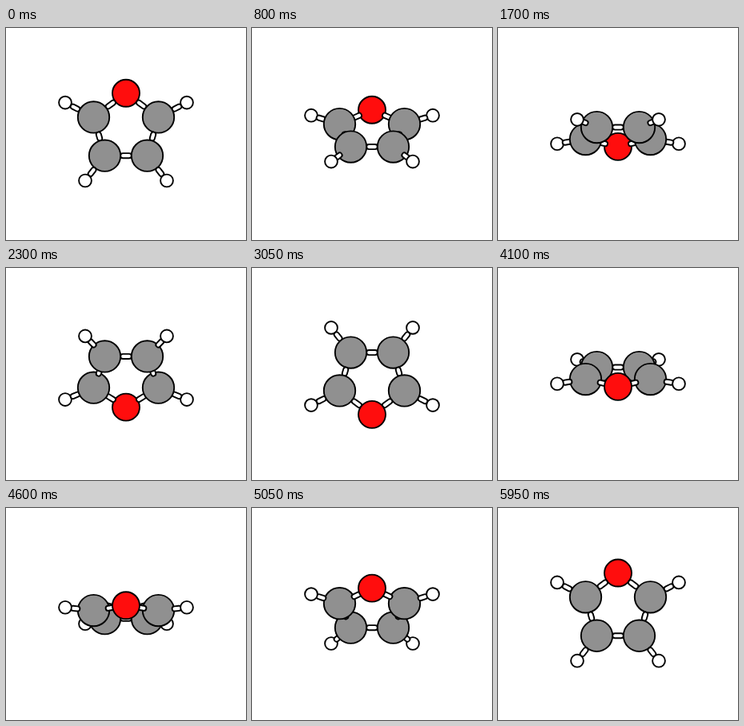
An HTML page with a canvas that plays this animation: 300 px wide and 266 px high, repeating every 6000 ms.

```html
<!DOCTYPE html>
<html lang="en">
<head>
<meta charset="utf-8">
<title>Rotating ring molecule</title>
<style>
html, body { margin: 0; width: 100%; height: 100%; overflow: hidden; background: #fff; }
canvas { display: block; }
</style>
</head>
<body>
<canvas id="stage" width="300" height="266"></canvas>
<script>
const ctx = document.getElementById('stage').getContext('2d');
const CX = 150, CY = 133;
const LOOP = 6000, STEP = 50, STEP_DEG = 3, START_DEG = 6;
const LINE = 1.9, BOND = 8, GAP = 3;

const KINDS = {
  O: { r: 17, fill: '#ff0d0d' },
  C: { r: 19.7, fill: '#909090' },
  H: { r: 7.9, fill: '#ffffff' }
};

// Flat molecule: x and y measured from the rotation centre
const atom = (kind, x, y) => ({ ...KINDS[kind], x, y });
const atoms = [
  atom('O', 0, -51.5),
  atom('C', -40.5, -21.2), atom('C', 40.5, -21.2),
  atom('C', -26.5, 27.3), atom('C', 26.5, 27.3),
  atom('H', -76, -39.6), atom('H', 76, -39.6),
  atom('H', -51, 58.8), atom('H', 51, 58.8)
];

const bonds = [[0, 1], [0, 2], [1, 3], [2, 4], [3, 4], [1, 5], [2, 6], [3, 7], [4, 8]]
  .map(([i, j]) => {
    const a = atoms[i], b = atoms[j];
    const dx = b.x - a.x, dy = b.y - a.y, len = Math.hypot(dx, dy);
    const along = d => ({ x: a.x + dx * d / len, y: a.y + dy * d / len });
    return {
      from: along(a.r + GAP),
      to: along(len - b.r - GAP),
      y: (a.y + b.y) / 2
    };
  });

const parts = [...bonds, ...atoms];

function drawAtom(a, c) {
  ctx.beginPath();
  ctx.arc(CX + a.x, CY + a.y * c, a.r, 0, Math.PI * 2);
  ctx.fillStyle = a.fill;
  ctx.fill();
  ctx.lineWidth = LINE;
  ctx.strokeStyle = '#000';
  ctx.stroke();
}

function drawBond(b, c) {
  ctx.beginPath();
  ctx.moveTo(CX + b.from.x, CY + b.from.y * c);
  ctx.lineTo(CX + b.to.x, CY + b.to.y * c);
  ctx.lineWidth = BOND;
  ctx.strokeStyle = '#000';
  ctx.stroke();
  ctx.lineWidth = BOND - 2 * LINE;
  ctx.strokeStyle = '#fff';
  ctx.stroke();
}

function draw(ms) {
  const step = Math.floor((ms % LOOP) / STEP);
  const angle = (START_DEG + step * STEP_DEG) * Math.PI / 180;
  const c = Math.cos(angle), s = Math.sin(angle);
  ctx.fillStyle = '#fff';
  ctx.fillRect(0, 0, 300, 266);
  ctx.lineCap = 'round';
  // Far parts first
  parts.sort((p, q) => (p.y - q.y) * s);
  for (const p of parts) p.from ? drawBond(p, c) : drawAtom(p, c);
}

const start = performance.now();
function tick() {
  draw(performance.now() - start);
  requestAnimationFrame(tick);
}
tick();
</script>
</body>
</html>
```
